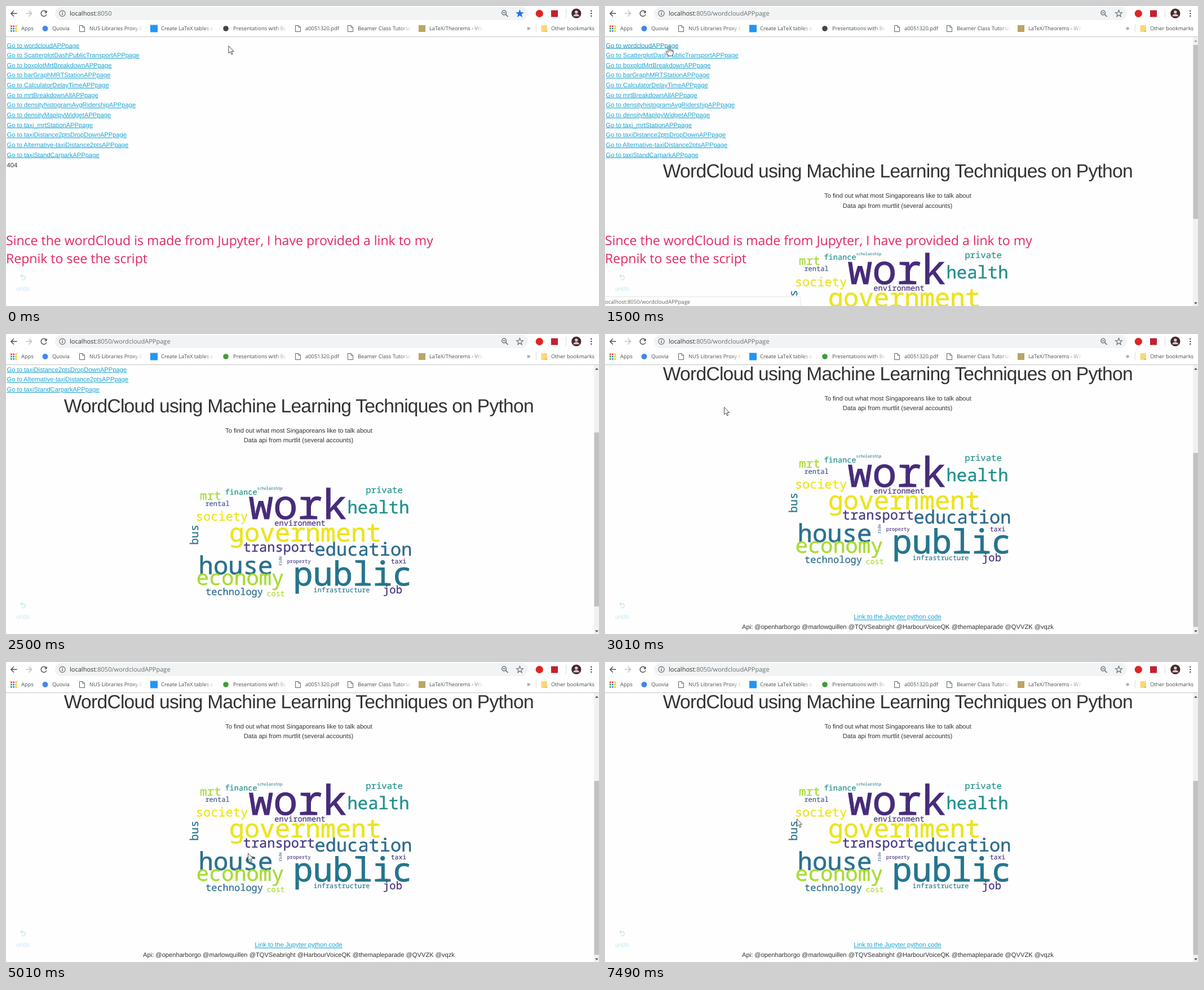
Recreate the animation shown at these times as an HTML page. Size 1052 by 532 pixels, loop 8 s.

```html
<!DOCTYPE html>
<html lang="en">
<head>
<meta charset="utf-8">
<title>Word cloud page</title>
<style>
html, body { margin: 0; width: 100%; height: 100%; overflow: hidden; background: #fefefe; }
svg { display: block; width: 100vw; height: 100vh; }
text { white-space: pre; text-rendering: geometricPrecision; }
.ui { font-family: "Open Sans", "Noto Sans", sans-serif; }
.bm { font-size: 9.4px; fill: #4a4d50; }
.page { font: 11.15px "Liberation Sans", Arial, sans-serif; fill: #333; }
.mid { text-anchor: middle; }
.link { font-size: 11.2px; fill: #1ca5d4; }
.link.hover { fill: #0f93c2; }
.cloud { font-family: "Noto Sans Mono", "DejaVu Sans Mono", monospace; text-anchor: middle; }
.cloud text { stroke-width: .014em; }
.note { font-size: 23.05px; fill: #e4265f; }
.line { fill: none; stroke: #4a4d50; stroke-width: 1.4; }
</style>
</head>
<body>
<svg id="stage" viewBox="0 0 1052 532" preserveAspectRatio="none"></svg>
<script>
const LOOP = 8000;
const stage = document.getElementById("stage");

const text = (s, x, y, attrs = "") => `<text x="${x}" y="${y}" ${attrs}>${s}</text>`;
const rect = (x, y, w, h, fill, attrs = "") =>
  `<rect x="${x}" y="${y}" width="${w}" height="${h}" fill="${fill}" ${attrs}/>`;
const circle = (x, y, r, fill, attrs = "") =>
  `<circle cx="${x}" cy="${y}" r="${r}" fill="${fill}" ${attrs}/>`;
const path = (d, attrs = "") => `<path d="${d}" ${attrs}/>`;

const links = ["wordcloud", "ScatterplotDashPublicTransport", "boxplotMrtBreakdown",
  "barGraphMRTStation", "CalculatorDelayTime", "mrtBreakdownAll",
  "densityhistogramAvgRidership", "densityMapIpyWidget", "taxi_mrtStation",
  "taxiDistance2ptsDropDown", "Alternative-taxiDistance2pts", "taxiStandCarpark"];

// word, centre x, baseline, size, colour, rotated
const words = [
  ["work", 517.5, 271, 72.5, "#472c7a"],
  ["government", 531, 311, 45, "#ece41c"],
  ["house", 407.5, 369, 44, "#2a718e"],
  ["public", 615, 389, 58.8, "#25758e"],
  ["economy", 415.5, 388, 37, "#a8db34"],
  ["education", 634, 336.5, 32, "#2e6a8e"],
  ["transport", 484.5, 329, 23.6, "#463a82"],
  ["health", 660.5, 261, 30.6, "#21908d"],
  ["society", 383, 274.5, 22, "#ece41c"],
  ["environment", 521.5, 283, 13.7, "#46327e"],
  ["mrt", 363, 237, 21, "#a5da36"],
  ["finance", 417, 228, 13.6, "#21908d"],
  ["rental", 375, 248, 12, "#3a538b"],
  ["scholarship", 468, 219.5, 6.8, "#27808e"],
  ["private", 671, 225, 15.6, "#21918c"],
  ["property", 519.5, 349, 8.7, "#463480"],
  ["taxi", 696.5, 350, 11.5, "#472f7d"],
  ["technology", 405, 406, 17, "#2e6e8e"],
  ["cost", 478.5, 408, 13.4, "#a8db34"],
  ["infrastructure", 595.5, 401, 11.9, "#2b758e"],
  ["job", 686, 403, 18.8, "#472f7d"],
  ["bus", 341, 299.5, 20, "#2a788e", true],
  ["ride", 488.5, 346, 7, "#3a6a8c", true]
];

const drawLink = (name, i) =>
  text(`Go to ${name}APPpage`, 1.5, 73.5 + i * 17.64,
    `class="link" id="link${i}" text-decoration="underline"`);

const drawWord = ([s, x, y, size, fill, turned]) =>
  text(s, x, y, `font-size="${size}" fill="${fill}" stroke="${fill}"` +
    (turned ? ` transform="rotate(-90 ${x} ${y})"` : ""));

const page = () => `
  <g clip-path="url(#view)">
    <g id="scroll" class="page">
      ${links.map(drawLink).join("")}
      ${text("404", 1.5, 285.5, 'id="missing"')}
      <g id="result">
        ${text("WordCloud using Machine Learning Techniques on Python", 519.3, 304,
          'class="mid" font-size="33.58" letter-spacing="-.74"')}
        ${text("To find out what most Singaporeans like to talk about", 519.5, 340, 'class="mid"')}
        ${text("Data api from murtlit (several accounts)", 519, 357.6, 'class="mid"')}
        <g class="cloud" transform="translate(0 222)">${words.map(drawWord).join("")}</g>
        ${text("Link to the Jupyter python code", 519, 727.8,
          'class="mid link" text-decoration="underline"')}
        ${text("Api: @openharborgo @marlowquillen @TQVSeabright @HarbourVoiceQK @themapleparade @QVVZK @vqzk",
          519.5, 745.4, 'class="mid"')}
      </g>
    </g>
  </g>
  <g opacity=".23">
    ${path("M26.8 478.6H31a3.4 3.4 0 0 1 0 6.8H28M29 475.8L26.2 478.6L29 481.4",
      'fill="none" stroke="#1ca5d4" stroke-width="1.5"')}
    ${text("undo", 30.3, 505, 'class="page mid" style="fill:#1ca5d4"')}
  </g>
  <g id="note" class="ui note">
    ${text("Since the wordCloud is made from Jupyter, I have provided a link to my", 0, 424)}
    ${text("Repnik to see the script", 0, 456)}
  </g>
  <g id="bar">
    ${rect(1043, 55, 9, 477, "#f1f1f1")}
    ${path("M1045 63.5L1048 60L1051 63.5Z", 'id="up"')}
    ${path("M1045 525.5L1048 529L1051 525.5Z", 'fill="#505050"')}
    ${rect(1043.5, 69, 8.5, 308.5, "#c1c1c1", 'id="thumb"')}
  </g>
  <g id="status">
    ${path("M-1 515.5H344a3 3 0 0 1 3 3V533H-1Z", 'fill="#fdfdfd" stroke="#e6e6e6"')}
    ${text("", 0, 527.8, 'id="hint" class="ui" font-size="9.5" fill="#666"')}
  </g>`;

const docIcon = x => path(`M${x} 34.5h5.5l3.5 3.5v7.5h-9ZM${x + 5.5} 34.5v3.5h3.5`,
  'fill="#fff" stroke="#5f6368"');

const bookmark = (s, x, fade = true) => {
  const label = text(s, x, 43, 'class="bm"');
  return fade
    ? `<g clip-path="url(#cut${x})">${label}</g>${rect(x + 76, 32, 19, 16, "url(#fade)")}`
    : label;
};

const cut = x => `<clipPath id="cut${x}">${rect(x, 30, 94, 20, "#000")}</clipPath>`;

const appsGrid = () => {
  const hues = ["#ea4335", "#ea4335", "#fbbc05", "#34a853", "#4285f4", "#fbbc05",
    "#34a853", "#4285f4", "#fbbc05"];
  return hues.map((c, i) => rect(8 + i % 3 * 4.2, 34.5 + Math.floor(i / 3) * 4.2, 2.8, 2.8, c)).join("");
};

const starPath = () => {
  const pts = Array.from({ length: 10 }, (_, i) => {
    const a = i * Math.PI / 5 - Math.PI / 2, r = i % 2 ? 2.6 : 6.2;
    return `${(911.5 + r * Math.cos(a)).toFixed(2)} ${(13.6 + r * Math.sin(a)).toFixed(2)}`;
  });
  return `M${pts.join("L")}Z`;
};

const chrome = () => `
  ${rect(0, 0, 1052, 54, "#fff")}
  ${rect(0, 54, 1052, 1, "#c4c4c4")}
  ${rect(87, 2, 839, 23, "#f1f3f4", 'rx="11.5"')}
  ${path("M19.5 13.3H9M14 8.2L8.9 13.3L14 18.4", 'class="line"')}
  ${path("M35 13.3H45.5M40.5 8.2L45.6 13.3L40.5 18.4", 'class="line" style="stroke:#bdc0c3"')}
  ${path("M71.2 10.2A5 5 0 1 0 72 14.6", 'class="line"')}
  ${path("M72.6 7.8V12.4H68Z", 'fill="#4a4d50"')}
  ${circle(100, 13.3, 5.2, "none", 'stroke="#5f6368" stroke-width="1.1"')}
  ${path("M100 12.6V16.2M100 10.2V11.5", 'class="line" style="stroke-width:1.2"')}
  <text x="113" y="17.3" class="ui" font-size="11.06" fill="#6a6d70"><tspan fill="#303134">localhost</tspan>:8050<tspan id="route"></tspan></text>
  ${circle(883.6, 12, 3.8, "none", 'stroke="#5f6368" stroke-width="1.3"')}
  ${path("M886.4 14.8L890.6 19M881.8 12H885.4", 'class="line" style="stroke:#5f6368"')}
  ${path(starPath(), 'id="star" stroke-width="1.1"')}
  ${circle(946.3, 13.3, 6.6, "#e02424")}
  ${rect(967, 7.5, 12, 12, "#c4202f")}
  ${rect(993, 6, 1, 15, "#dadce0")}
  ${circle(1011.8, 13.2, 8.6, "#47282c")}
  ${circle(1011.8, 10.8, 2.7, "#d9c9c9")}
  ${path("M1006.6 18.2a5.2 4 0 0 1 10.4 0Z", 'fill="#d9c9c9"')}
  ${[8.8, 13.3, 17.8].map(y => circle(1038.3, y, 1.3, "#4a4d50")).join("")}
  <g class="ui">
    ${appsGrid()}
    ${bookmark("Apps", 27, false)}
    ${circle(69.5, 40, 5, "#4285f4")}
    ${bookmark("Quovia", 82, false)}
    ${docIcon(130.5)}${bookmark("NUS Libraries Proxy Ex", 148)}
    ${rect(256, 33.5, 13, 13, "#2196f3")}${bookmark("Create LaTeX tables on", 275)}
    ${circle(390, 40, 4.8, "#444", 'id="dot"')}${bookmark("Presentations with Bea", 403)}
    ${docIcon(513.5)}${bookmark("a0051320.pdf", 531, false)}
    ${docIcon(606.5)}${bookmark("Beamer Class Tutorial", 624)}
    ${rect(732, 34, 12, 12, "#b9a566")}${bookmark("LaTeX/Theorems - Wik", 751)}
    ${text("»", 924, 43, 'font-size="12" fill="#4a4d50"')}
    ${rect(940, 32, 1, 15, "#dadce0")}
    ${path("M949.5 34h9.5a1 1 0 0 1 1 1v11h-10.5Z", 'fill="#f9d978"')}
    ${path("M956.5 46v-3h3.5v3Z", 'fill="#e9bd4d"')}
    ${bookmark("Other bookmarks", 967, false)}
  </g>`;

const cursors = `
  <g id="cursor" stroke-linejoin="round">
    ${path("M.5 .3V13.4L3.5 10.6L5.6 15.4L7.6 14.5L5.5 9.9H9.6Z",
      'id="arrow" fill="#fff" stroke="#333" stroke-width=".9"')}
    ${path("M-1.4 10V1.2a1.3 1.3 0 0 1 2.6 0V6.2q2 -.8 2.5 .6q1.8 -.6 2.2 .7q1.7 -.3 1.7 1.3V12q0 2.2 -1.4 3.6V17.4H-1.2V15.9L-5.2 10.9q-.4 -1.9 1.7 -1.7L-1.4 11ZM1.2 6.2V9.3M3.7 6.8V9.5M5.9 7.5V9.8",
      'id="hand" fill="#fff" stroke="#333" stroke-width=".9"')}
    ${path("M-2.5 -6.2H-.6L0 -5.6L.6 -6.2H2.5M0 -5.6V6M-2.5 6.6H-.6L0 6L.6 6.6H2.5",
      'id="beam" fill="none" stroke="#444"')}
  </g>`;

stage.innerHTML = `
  <defs>
    <clipPath id="view">${rect(0, 55, 1052, 477, "#000")}</clipPath>
    ${[148, 275, 403, 624, 751].map(cut).join("")}
    <linearGradient id="fade">
      <stop offset="0" stop-color="#fff" stop-opacity="0"/>
      <stop offset="1" stop-color="#fff"/>
    </linearGradient>
  </defs>
  ${rect(0, 0, 1052, 532, "#fefefe")}${page()}${chrome()}${cursors}`;

const el = {};
stage.querySelectorAll("[id]").forEach(n => el[n.id] = n);

// start time, x, y, shape
const moves = [
  [0, 394.5, 70.5, "arrow"], [500, 113.5, 71.2, "hand"], [2000, 211, 129.5, "arrow"],
  [2500, 212, 130.5, "beam"], [3010, 211, 129.5, "arrow"], [3490, 224, 143, "arrow"],
  [3990, 480, 438, "arrow"], [4490, 496, 485, "arrow"], [5010, 429, 339, "arrow"],
  [5480, 448.5, 237, "arrow"], [5990, 528, 321.5, "arrow"], [6500, 487, 330, "arrow"],
  [6990, 567, 330, "arrow"], [7490, 340, 278, "arrow"]
];
const scrolls = [[0, 0], [2000, 105.5], [2500, 165.5], [3010, 222.3]];

const at = (steps, t) => steps.findLast(s => s[0] <= t);
const show = (node, on) => node.setAttribute("visibility", on ? "visible" : "hidden");

function render(t) {
  const [, x, y, shape] = at(moves, t);
  const top = at(scrolls, t)[1];
  const clicked = t >= 1000, loaded = t >= 1500;

  el.cursor.setAttribute("transform", `translate(${x} ${y})`);
  for (const name of ["arrow", "hand", "beam"]) show(el[name], name === shape);
  el.link0.classList.toggle("hover", shape === "hand");

  el.scroll.setAttribute("transform", `translate(0 ${-top})`);
  el.thumb.setAttribute("y", 69 + top * 0.638);
  el.up.setAttribute("fill", top ? "#505050" : "#a3a3a3");
  show(el.bar, loaded);
  show(el.result, loaded);
  show(el.missing, !loaded);
  show(el.note, t < 2500);

  el.route.textContent = clicked ? "/wordcloudAPPpage" : "";
  el.star.setAttribute("fill", clicked ? "none" : "#1a73e8");
  el.star.setAttribute("stroke", clicked ? "#5f6368" : "#1a73e8");
  el.dot.setAttribute("fill", t < 2500 ? "#444" : "#3f9c3a");

  show(el.status, clicked && t < 2500);
  el.hint.textContent = `ocalhost:8050/${links[t < 2000 ? 0 : 6]}APPpage`;
}

const start = performance.now();
function tick() {
  render((performance.now() - start) % LOOP);
  requestAnimationFrame(tick);
}
tick();
</script>
</body>
</html>
```
